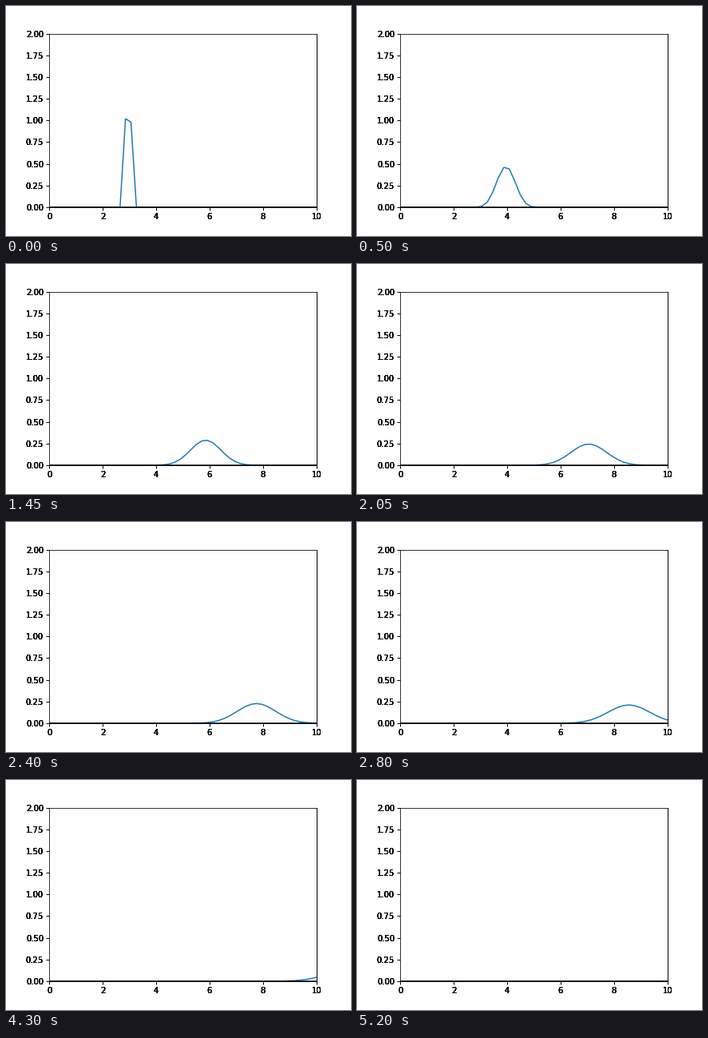
These frames come from a looping animation (432x288 px, 10000 ms). A matplotlib script:

```python
import numpy as np
import matplotlib.pyplot as plt
from matplotlib.animation import FuncAnimation

STEPS, INTERVAL = 200, 50
SHIFT = 0.1          # distance travelled per time step
LABEL_PASSES = 6     # stacked drawing gives the heavy tick labels

plt.rcParams["font.family"] = "DejaVu Sans"
plt.rcParams["font.size"] = 10

x = np.linspace(0, 10, 50)
courant = SHIFT / (x[1] - x[0])


def advect(u):
    """One first-order upwind step to the right."""
    new = u.copy()
    new[1:] -= courant * (u[1:] - u[:-1])
    return new


def solve():
    u = np.zeros_like(x)
    u[14] = 2.0
    states = []
    for _ in range(STEPS):
        u = advect(u)
        states.append(u)
    return states


states = solve()

fig = plt.figure(figsize=(6, 4), dpi=72, facecolor="white")
fig.subplots_adjust(left=0.125, right=0.9, bottom=0.125, top=0.88)
ax = fig.add_subplot(facecolor="#fefefe")
ax.set_xlim(0, 10)
ax.set_ylim(0, 2)

xticks = np.arange(0, 11, 2)
yticks = np.arange(0, 2.01, 0.25)
ax.set_xticks(xticks)
ax.set_yticks(yticks)
ax.tick_params(length=4, width=1, labelbottom=False, labelleft=False)
for side in ("right", "bottom"):
    ax.spines[side].set_linewidth(1)

x_trans, x_va, x_ha = ax.get_xaxis_text1_transform(7)
y_trans, y_va, y_ha = ax.get_yaxis_text1_transform(7)
for _ in range(LABEL_PASSES):
    for v in xticks:
        ax.text(v, 0, f"{v:d}", transform=x_trans, va=x_va, ha=x_ha)
    for v in yticks:
        ax.text(0, v, f"{v:.2f}", transform=y_trans, va=y_va, ha=y_ha)

wave, = ax.plot(x, states[0], color="#1f77b4", lw=1.5)
ax.plot([0, 10], [0, 0], color="black", lw=1.5)


def update(i):
    wave.set_ydata(states[i])
    return wave,


anim = FuncAnimation(fig, update, frames=STEPS, interval=INTERVAL,
                     repeat=True, repeat_delay=0)
plt.show()
```
